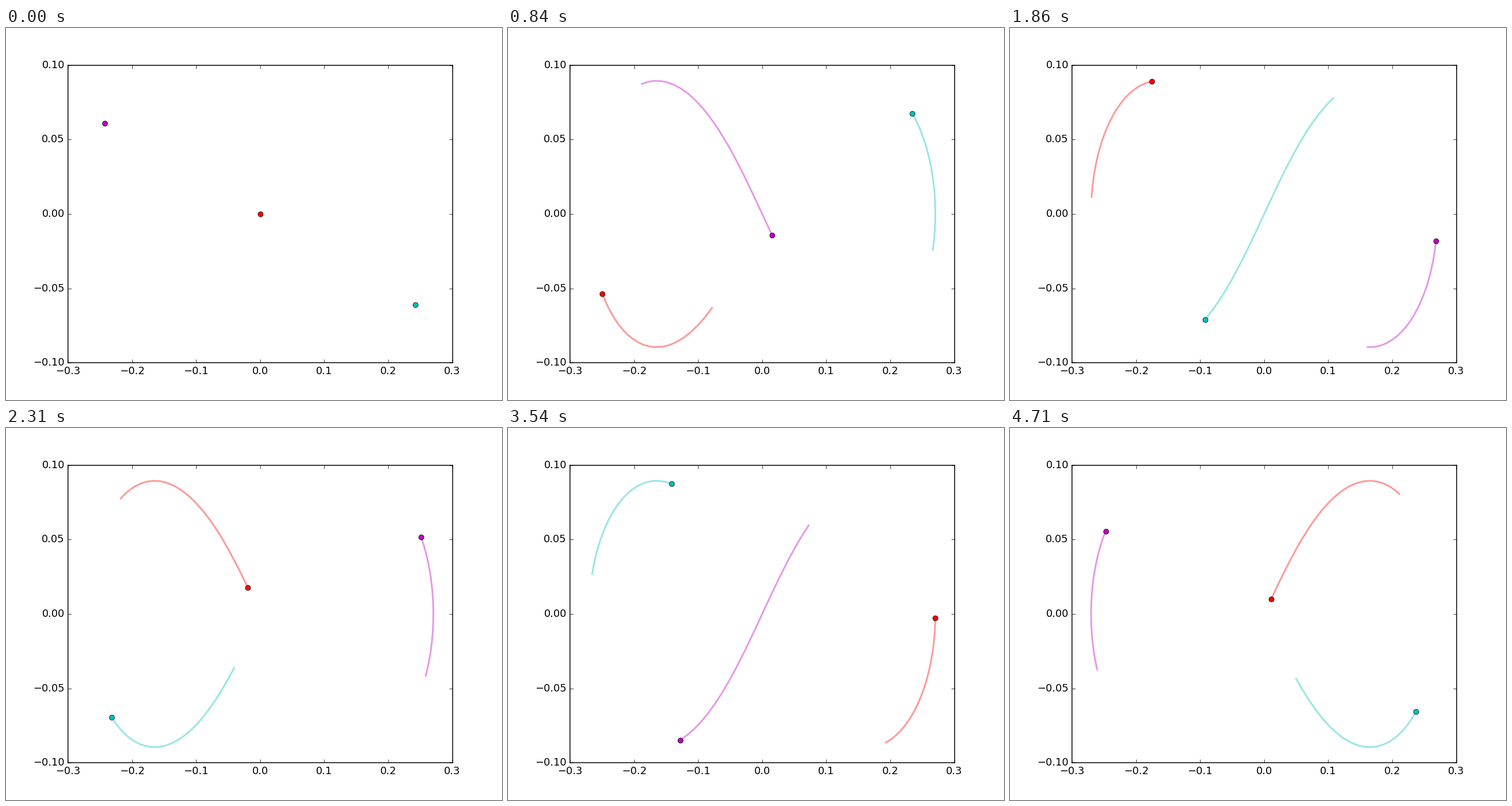
Write a matplotlib script that moves like this. It is 864 px wide and 648 px high and loops after 4.74 s.

```python
import numpy as np
import matplotlib.pyplot as plt
from matplotlib.animation import FuncAnimation

plt.style.use("classic")
plt.rcParams.update({
    "font.family": "DejaVu Sans",
    "figure.facecolor": "white",
    "savefig.facecolor": "white",
    "savefig.dpi": "figure",
})

FRAMES = 158
INTERVAL = 30
STEP = 0.04       # simulated time per frame
SUBSTEPS = 10
TRAIL = 20        # frames covered by each trail
SCALE = 0.25
COLORS = "rmc"


def acceleration(pos):
    """Gravity between equal unit masses."""
    diff = pos[None, :, :] - pos[:, None, :]
    dist = np.sqrt((diff ** 2).sum(axis=2))
    np.fill_diagonal(dist, 1)
    return (diff / dist[:, :, None] ** 3).sum(axis=1)


def derivative(state):
    return np.array([state[1], acceleration(state[0])])


def rk4(state, h):
    k1 = derivative(state)
    k2 = derivative(state + h / 2 * k1)
    k3 = derivative(state + h / 2 * k2)
    k4 = derivative(state + h * k3)
    return state + h / 6 * (k1 + 2 * k2 + 2 * k3 + k4)


def figure_eight():
    """Scaled positions, indexed by frame, body, axis."""
    start = np.array([0.97000436, -0.24308753])
    speed = np.array([-0.93240737, -0.86473146])
    state = np.array([
        [0 * start, -start, start],
        [speed, -speed / 2, -speed / 2],
    ])
    path = [state[0]]
    for _ in range(FRAMES - 1):
        for _ in range(SUBSTEPS):
            state = rk4(state, STEP / SUBSTEPS)
        path.append(state[0])
    return SCALE * np.array(path)


path = figure_eight()

fig, ax = plt.subplots(figsize=(8, 6), dpi=108)
ax.set_xlim(-0.3, 0.3)
ax.set_ylim(-0.1, 0.1)

trails = [ax.plot([], [], color=c, lw=2, alpha=0.4, zorder=2)[0] for c in COLORS]
dots = [ax.plot([], [], "o", color=c, zorder=3)[0] for c in COLORS]


def draw(frame):
    first = max(0, frame - TRAIL)
    for body, (trail, dot) in enumerate(zip(trails, dots)):
        recent = path[first:frame + 1, body]
        # a single point has no trail yet
        trail.set_data(*(recent.T if frame else ([], [])))
        dot.set_data(*recent[-1:].T)
    return trails + dots


anim = FuncAnimation(fig, draw, frames=FRAMES, interval=INTERVAL,
                     repeat=True, repeat_delay=0, blit=False)
plt.show()
```
